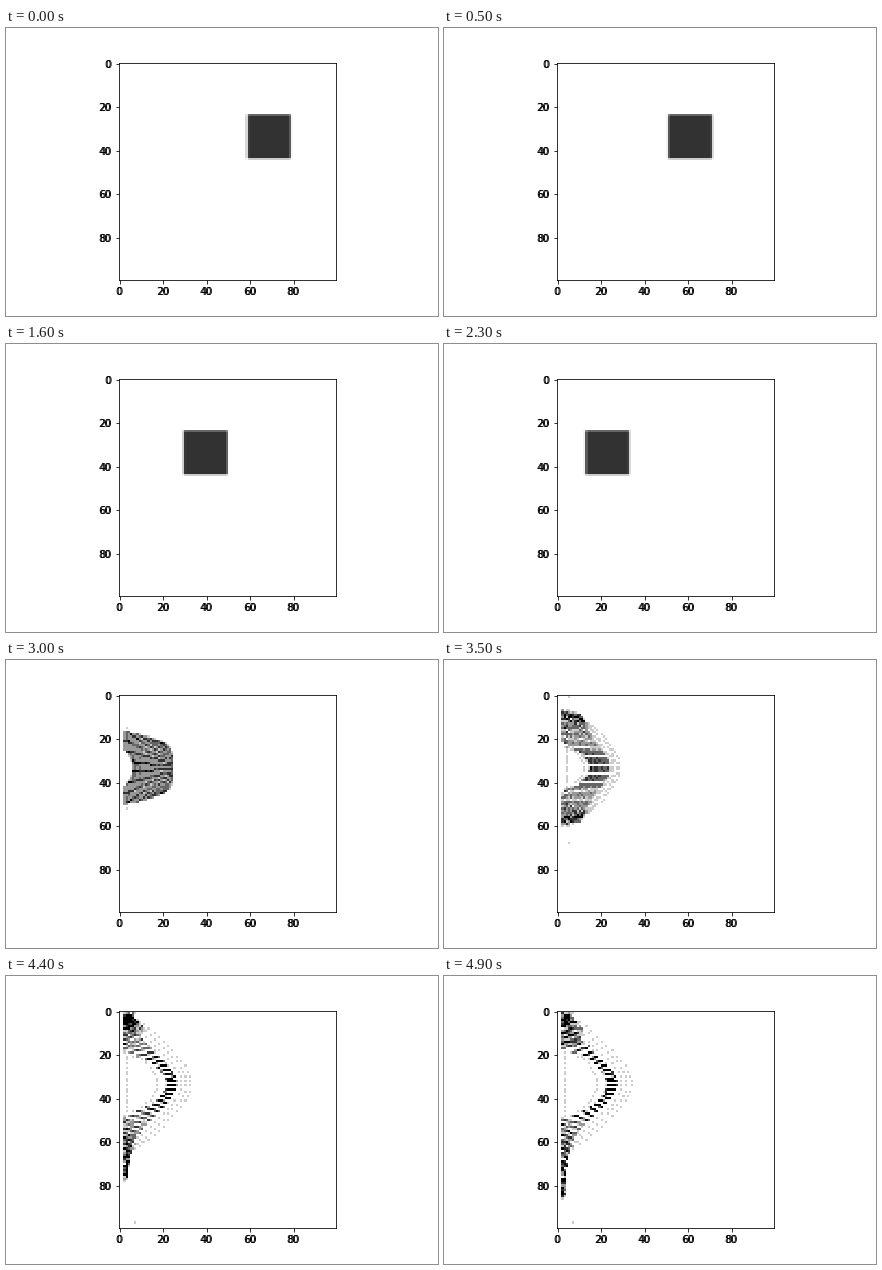
These frames come from a looping animation (432 by 288 pixels, 5000 ms). A matplotlib script:

```python
import numpy as np
import matplotlib.pyplot as plt
from matplotlib.animation import FuncAnimation

SIZE, LAYERS, FRAMES, INTERVAL = 100, 40, 50, 100
MASS = 0.2           # grey added by one particle
WALL = 2.0
IMPACT = 26

layer, line = np.meshgrid(np.arange(LAYERS), np.arange(LAYERS))
u = layer / (LAYERS - 1)               # 0 at the wall side, 1 at the back
w = 2 * line / (LAYERS - 1) - 1        # -1 at the top, 1 at the bottom

# Mirrored noise that grows away from the axis of symmetry.
half_noise = np.random.default_rng(4).normal(0, 1, (LAYERS // 2, LAYERS))
noise = np.vstack([-half_noise, half_noise[::-1]]) * w**2


def falling_block(t):
    x = 58.6 - 1.4245 * t - 0.0245 * t * t + 0.5 * layer
    return x, 24 + 0.5 * line


def squashed_dome():
    inner = WALL + 4 * np.clip(1 - (1.85 * w) ** 2, 0, 1)
    outer = 24.4 - 4.5 * w**4
    x = inner + (outer - inner) * u**1.15
    return x, 33.4 + 16.2 * w * (1 - 0.28 * u**1.6)


def arch(tip, sigma, hollow, hollow_half, reach):
    """Bell-shaped band of radial lines, with loose arcs inside and outside."""
    edge = 38 * w + (reach - 38) * w**5
    bell = np.exp(-(edge / sigma) ** 2)
    flare = 4 * (1 - bell) * (1 - np.abs(edge) / reach)
    outer = WALL + 0.6 + tip * bell + flare
    root = edge * (1 - 0.16 * (1 - w**2))
    cavity = np.clip(1 - (root / hollow_half) ** 2, 0, 1) ** 0.8
    inner = WALL + hollow * cavity

    s = np.clip((layer - 2) / 34, 0, 1)
    x = inner + (outer - inner) * s
    dy = root + (edge - root) * s

    arc = np.clip(layer - 36, 0, 3) * np.clip(1 - (edge / 30) ** 4, 0, 1)
    x += 2.25 * arc
    dy *= 1 + 0.06 * arc

    hollow_lines = cavity > 0
    x = np.where(hollow_lines & (layer == 0), 3, x)
    x = np.where(hollow_lines & (layer == 1), WALL + 0.78 * (inner - WALL), x)
    return x, 33.3 + dy + 1.2 * noise * (arc == 0)


POSES = [
    (IMPACT, falling_block(IMPACT)),
    (30, squashed_dome()),
    (39, arch(22.0, 19, 18.5, 13, 33)),
    (49, arch(24.4, 17.5, 20.5, 16, 50)),
]


def particles(t):
    if t <= IMPACT:
        return falling_block(t)
    for (t0, a), (t1, b) in zip(POSES, POSES[1:]):
        if t <= t1:
            s = (t - t0) / (t1 - t0)
            x, y = (p + (q - p) * s for p, q in zip(a, b))
            break
    # The top wall throws particles back down and away from the side wall.
    over = np.clip(WALL - y, 0, None)
    x = x + u * np.minimum(8, 0.8 * over)
    y = np.where(over > 0, 1 + 0.7 * over, y)
    return np.maximum(x, WALL), y


def strays(t):
    """One fast particle on each side, running along the wall."""
    if t < 29:
        return np.empty(0), np.empty(0)
    reach = 18.5 + 3.3 * (t - 30)
    x = min(7, 3 + 4 * (t - 30) / 9)
    return np.full(2, x), np.clip([33.5 - reach, 33.5 + reach], 1, 97)


def density(t):
    x, y = (np.concatenate([p.ravel(), q])
            for p, q in zip(particles(t), strays(t)))
    if t > IMPACT:      # once broken up, each particle fills a single cell
        x, y = np.rint(x), np.rint(y)
    grid = np.zeros((SIZE, SIZE))
    col, row = np.floor(x).astype(int), np.floor(y).astype(int)
    fx, fy = x - col, y - row
    for dr, wy in ((0, 1 - fy), (1, fy)):
        for dc, wx in ((0, 1 - fx), (1, fx)):
            r = np.clip(row + dr, 0, SIZE - 1)
            c = np.clip(col + dc, 0, SIZE - 1)
            np.add.at(grid, (r, c), MASS * wx * wy)
    return np.clip(grid, 0, 1)


fig = plt.figure(figsize=(6, 4), dpi=72, facecolor="white")
side = 0.755 * 288


def add_frame(shift=0):
    left = 221.4 - side / 2 + shift
    ax = fig.add_axes([left / 432, 0.125, side / 432, 0.755],
                      label=f"frame {shift}", facecolor="none")
    ax.set(xlim=(-0.5, SIZE - 0.5), ylim=(SIZE - 0.5, -0.5),
           xticks=range(0, SIZE, 20), yticks=range(0, SIZE, 20))
    return ax


main = add_frame()
image = main.imshow(density(0), cmap="gray_r", vmin=0, vmax=1,
                    interpolation="nearest", aspect="auto")

# A second set of labels, one pixel aside, gives the heavy doubled digits.
ghost = add_frame(-1)
ghost.spines[:].set_visible(False)
ghost.tick_params(color="none")


def update(t):
    image.set_data(density(t))
    return [image]


anim = FuncAnimation(fig, update, frames=FRAMES, interval=INTERVAL,
                     repeat=True, repeat_delay=0, blit=False)
plt.show()
```
